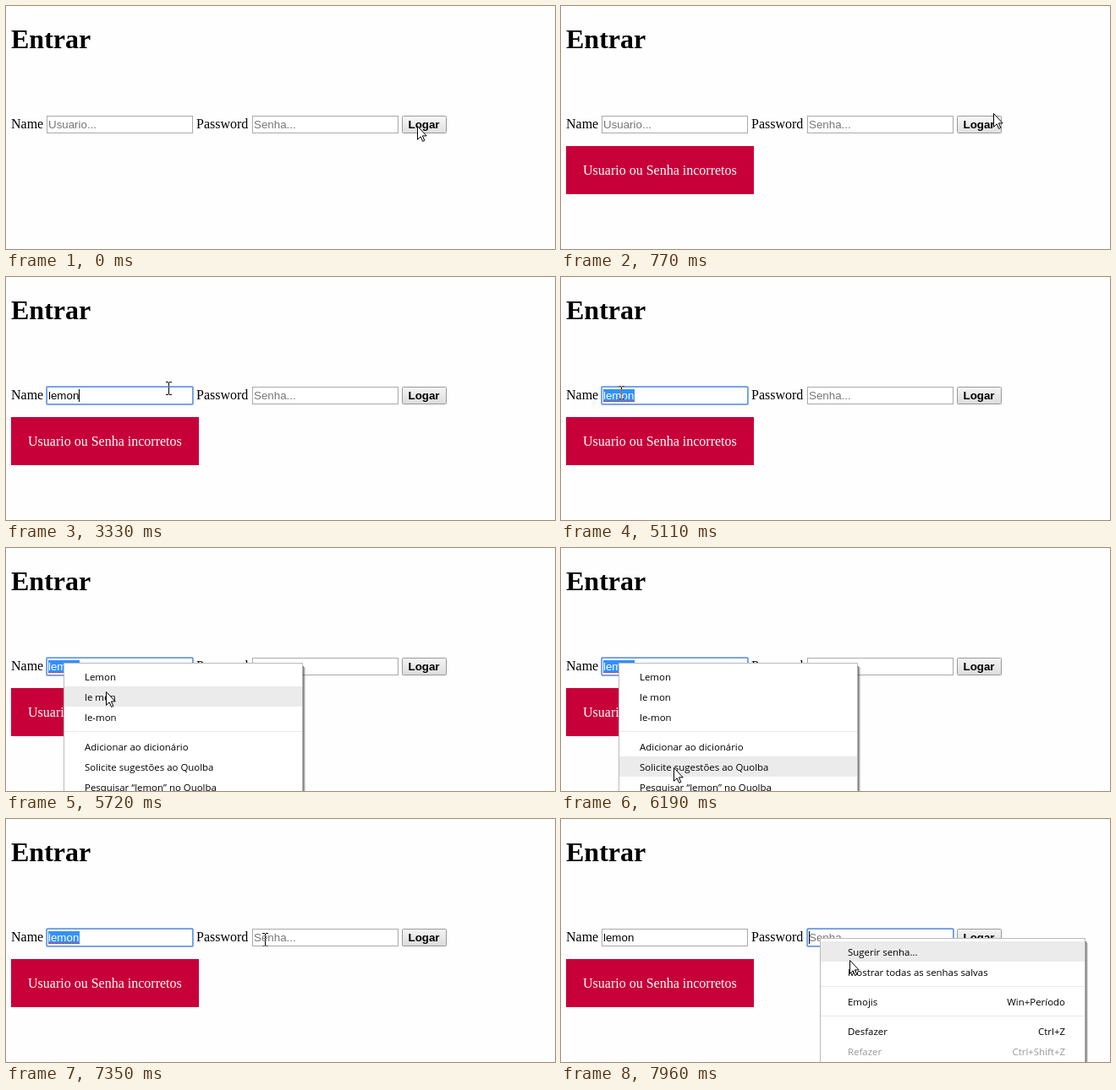
Animation, 649 px wide and 288 px high, one loop 8 s. Source, as an HTML page:

```html
<!DOCTYPE html>
<html lang="pt">
<head>
<meta charset="utf-8">
<title>Entrar</title>
<style>
  html, body { margin: 0; width: 100%; height: 100%; overflow: hidden; background: #fefefe; }
  svg { display: block; width: 649px; height: 288px; background: #fefefe; isolation: isolate; }
  text { white-space: pre; }
  .serif { font: 16px "Liberation Serif", serif; }
  .title { font: bold 32px "Liberation Serif", serif; }
  .field { font: 13.333px "Liberation Sans", sans-serif; }
  .hint { fill: #757575; }
  .label { font: bold 13.333px "Liberation Sans", sans-serif; }
  .menu { font: 11.45px "Open Sans", sans-serif; }
  #beam { mix-blend-mode: difference; }
</style>
</head>
<body>
<svg viewBox="0 0 649 288">
  <defs>
    <linearGradient id="up" x2="0" y2="1"><stop stop-color="#f4f4f4"/><stop offset="1" stop-color="#dcdcdc"/></linearGradient>
    <linearGradient id="over" x2="0" y2="1"><stop stop-color="#f8f8f8"/><stop offset="1" stop-color="#dfdfdf"/></linearGradient>
    <linearGradient id="down" x2="0" y2="1"><stop stop-color="#dcdcdc"/><stop offset="1" stop-color="#eeeeee"/></linearGradient>
  </defs>

  <text class="title" x="6" y="50">Entrar</text>
  <text class="serif" x="6" y="145">Name</text>
  <text class="serif" x="225" y="145">Password</text>

  <g fill="#fff" stroke="#a9a9a9">
    <rect x="48.5" y="130.5" width="172" height="20"/>
    <rect x="291.5" y="130.5" width="172" height="20"/>
  </g>
  <g id="ring" fill="none">
    <rect x="47.5" y="129.5" width="174" height="22" rx="1.5" stroke="#86adf0"/>
    <rect x="48.5" y="130.5" width="172" height="20" stroke="#6c99de"/>
  </g>
  <rect id="select" x="50" y="133" width="37" height="15" fill="#3390ff"/>
  <text id="user" class="field" x="50" y="145"></text>
  <path id="spell" d="M50 147.5H87" stroke="#d8323c" stroke-dasharray="3 1"/>
  <text class="field hint" x="293" y="145">Senha...</text>
  <rect id="caret" y="133" width="1" height="15"/>

  <rect id="button" x="468.5" y="130.5" width="52" height="20" rx="1" stroke="#999"/>
  <text class="label" x="475.5" y="145">Logar</text>

  <g id="error">
    <rect x="6" y="166" width="222" height="57" fill="#c70039"/>
    <text class="serif" x="26" y="200" fill="#fff">Usuario ou Senha incorretos</text>
  </g>

  <g id="menus"></g>

  <path id="arrow" fill="#fff" stroke="#000" d="M.5 .5V16.3L4.2 12.8L6.6 18.4L8.8 17.4L6.4 11.9H11.2Z"/>
  <path id="beam" fill="none" stroke="#fff" d="M-3 -7.5H0M1 -7.5H4M.5 -7V7M-3 7.5H0M1 7.5H4"/>
</svg>
<script>
const LOOP = 8000, TICK = 77.2, PHASE = 1550;
const ids = ['ring', 'select', 'user', 'spell', 'caret', 'button', 'error', 'menus', 'arrow', 'beam'];
const el = Object.fromEntries(ids.map(id => [id, document.getElementById(id)]));

const WORD = 'lemon';
const SUBMIT = 470, FAIL = 550, FOCUS = 2095, TYPE = 2870, KEY = 115, BLINK = 545;
const PICK = 4950, PASS = 7500;
const ROW = 24, GAP = 11;

// pointer glides: start, end, then the place reached
const home = [486, 142];
const glides = [
  [70, 160, 481, 132],
  [460, 770, 515, 126],
  [770, 845, 508, 138],
  [1480, 1855, 240, 140],
  [1855, 2165, 192, 132],
  [4170, 5100, 71, 137],
  [5100, 5180, 68, 136],
  [5180, 5715, 118, 170],
  [5795, 6410, 140, 300],
  [7179, 7180, 259, 193],
  [7180, 7335, 306, 143],
  [7570, 7955, 341, 167]
];

// rows: null is a separator, otherwise [text, shortcut, disabled]
const menus = [
  { from: 5180, to: 7040, x: 68, y: 136, w: 283, indent: 25,
    rows: [['Lemon'], ['le mon'], ['le-mon'], null, ['Adicionar ao dicionário'],
      ['Solicite sugestões ao Quolba'], ['Pesquisar “lemon” no Quolba']] },
  { from: 7570, to: LOOP, x: 306, y: 141, w: 314, indent: 33,
    rows: [['Sugerir senha...'], ['Mostrar todas as senhas salvas'], null,
      ['Emojis', 'Win+Período'], null, ['Desfazer', 'Ctrl+Z'], ['Refazer', 'Ctrl+Shift+Z', true]] }
];

const clamp = (v, lo, hi) => Math.min(hi, Math.max(lo, v));
const within = (v, a, b) => v >= a && v < b;
const ease = k => k * k * (3 - 2 * k);
const show = (node, on) => { node.style.display = on ? '' : 'none'; };

function add(parent, tag, attrs, text) {
  const node = document.createElementNS('http://www.w3.org/2000/svg', tag);
  for (const key in attrs) node.setAttribute(key, attrs[key]);
  if (text) node.textContent = text;
  return parent.appendChild(node);
}

function build(menu) {
  const { x, y, w, indent } = menu;
  const g = menu.node = add(el.menus, 'g', { class: 'menu' });
  for (let i = 0; i < 3; i++)
    add(g, 'rect', { x: x + w + i, y: y + 4 + i, width: 1, height: 300, opacity: 0.5 - i * 0.17 });
  add(g, 'rect', { x: x + .5, y: y + .5, width: w - 1, height: 300, fill: '#fff', stroke: '#bababa' });
  menu.light = add(g, 'rect', { x: x + 1, width: w - 2, height: ROW, fill: '#ebebeb' });
  menu.tops = [];
  let top = y + 4;
  for (const row of menu.rows) {
    if (!row) {
      add(g, 'rect', { x: x + 1, y: top + 5, width: w - 2, height: 1, fill: '#e9e9e9' });
      top += GAP;
      continue;
    }
    const [name, keys, off] = row, fill = off ? '#999' : '#000';
    add(g, 'text', { x: x + indent, y: top + 17, fill }, name);
    if (keys) add(g, 'text', { x: x + w - 24, y: top + 17, fill, 'text-anchor': 'end' }, keys);
    menu.tops.push(top);
    top += ROW;
  }
}

// the pointer is redrawn once per tick
function pointer(t) {
  const q = PHASE + TICK * Math.floor((t - PHASE) / TICK);
  let [x, y] = home;
  for (const [from, to, toX, toY] of glides) {
    const k = ease(clamp((q - from) / (to - from), 0, 1));
    x += (toX - x) * k;
    y += (toY - y) * k;
  }
  return [Math.round(x), Math.round(y)];
}

function drawFields(t) {
  const inPass = t >= PASS;
  const picked = within(t, PICK, PASS);
  const count = clamp(Math.floor((t - TYPE) / KEY) + 1, 0, WORD.length);

  el.user.textContent = WORD.slice(0, count) || 'Usuario...';
  el.user.setAttribute('fill', picked ? '#fff' : count ? '#000' : '#757575');
  show(el.select, picked);
  show(el.spell, picked);
  show(el.ring, t >= FOCUS);
  el.ring.setAttribute('transform', `translate(${inPass ? 243 : 0})`);

  // each key press restarts the blinking
  const since = inPass ? PASS : count ? TYPE + KEY * (count - 1) : FOCUS;
  const end = count ? Math.floor(el.user.getComputedTextLength()) : 0;
  el.caret.setAttribute('x', inPass ? 293 : 50 + end);
  show(el.caret, t >= FOCUS && !picked && Math.floor((t - since) / BLINK) % 2 === 0);
}

function drawMenu(menu, t, y) {
  const open = within(t, menu.from, menu.to);
  const top = menu.tops.find(r => within(y, r, r + ROW) && y < 288);
  show(menu.node, open);
  show(menu.light, top !== undefined);
  menu.light.setAttribute('y', top ?? 0);
  return open;
}

function draw(t) {
  const [x, y] = pointer(t);
  drawFields(t);
  show(el.error, t >= FAIL);

  const hover = within(x, 468, 521) && within(y, 125, 151);
  const look = within(t, SUBMIT, FAIL) ? 'down' : hover ? 'over' : 'up';
  el.button.setAttribute('fill', `url(#${look})`);

  const open = menus.filter(m => drawMenu(m, t, y)).length > 0;
  const overText = !open && within(y, 125, 151) && (within(x, 48, 221) || within(x, 291, 464));
  show(el.arrow, !overText);
  show(el.beam, overText);
  (overText ? el.beam : el.arrow).setAttribute('transform', `translate(${x} ${y})`);
}

menus.forEach(build);
const start = performance.now();
function frame() {
  draw((performance.now() - start) % LOOP);
  requestAnimationFrame(frame);
}
draw(0);
requestAnimationFrame(frame);
</script>
</body>
</html>
```
